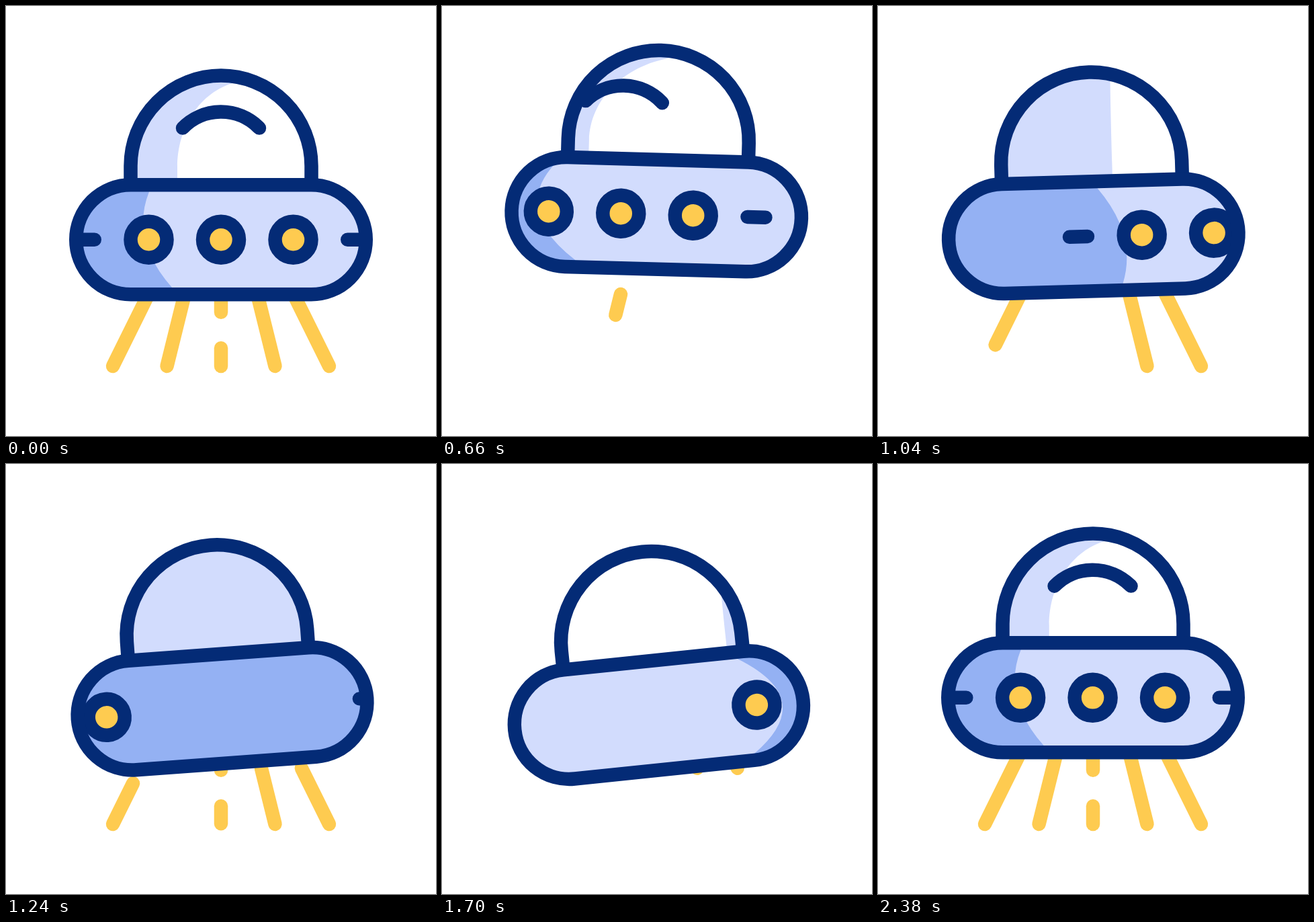
These frames come from a looping animation (640x640 px, 2400 ms). An HTML page with a canvas:

```html
<!DOCTYPE html>
<html lang="en">
<head>
<meta charset="utf-8">
<title>Flying saucer</title>
<style>
html, body { margin: 0; height: 100%; overflow: hidden; background: #fff; }
canvas { display: block; }
</style>
</head>
<body>
<canvas id="stage" width="640" height="640"></canvas>
<script>
const ctx = document.getElementById('stage').getContext('2d');
const NAVY = '#042b76', LIGHT = '#d2dcfd', SHADE = '#94b1f3', YELLOW = '#fecb50';
const LOOP = 2400, TURN = 1400, TRIM = 200;

// Keys: [time, value, slope]
const LIFT = [[0, 0], [600, -38.5], [1495, 30], [LOOP, 0]];
const TILT = [[0, 0], [640, 1.6], [1560, -6.4], [LOOP, 0]];
const SPIN = [[0, 0], [720, -54], [1040, 178.2, 1.2], [1440, 656.8, 1.18], [1980, 1218.8, 0.8], [LOOP, TURN]];

// Rays: top x, bottom x, start times of erase, draw, erase, draw
const RAYS = [
  [212, 159, [400, 913, 1150, 1875]],
  [266, 239.5, [100, 590, 800, 1640]],
  [320, 320, [420, 1050, 1282, 1980]],
  [374, 400.5, [100, 740, 1180, 1640]],
  [428, 481, [200, 760, 1180, 1640]]
];

const clamp = (v, lo, hi) => Math.min(hi, Math.max(lo, v));
const smooth = u => u * u * (3 - 2 * u);

function track(t, keys) {
  let i = 1;
  while (keys[i][0] < t) i++;
  const [t0, v0, m0 = 0] = keys[i - 1], [t1, v1, m1 = 0] = keys[i];
  const d = t1 - t0, u = (t - t0) / d, w = 1 - u;
  return v0 + (v1 - v0) * smooth(u) + d * u * w * (m0 * w - m1 * u);
}

function line(x0, y0, x1, y1) {
  ctx.beginPath();
  ctx.moveTo(x0, y0);
  ctx.lineTo(x1, y1);
  ctx.stroke();
}

function drawRay([top, bottom, times], t) {
  let from = 0, to = 1;
  times.forEach((start, i) => {
    if (t < start) return;
    const k = smooth(clamp((t - start) / TRIM, 0, 1));
    [from, to] = i % 2 ? [0, k] : [k, 1];
  });
  const parts = top === bottom ? [[0, 0.25], [0.75, 1]] : [[0, 1]];
  for (const [p, q] of parts) {
    const a = Math.max(p, from), b = Math.min(q, to);
    if (a < b) line(top + (bottom - top) * a, 429 + 107 * a, top + (bottom - top) * b, 429 + 107 * b);
  }
}

function domePath() {
  ctx.beginPath();
  ctx.moveTo(-134.5, 266);
  ctx.lineTo(-134.5, 238);
  ctx.arc(0, 238, 134.5, Math.PI, 0);
  ctx.lineTo(134.5, 266);
}

function bodyPath() {
  ctx.beginPath();
  ctx.arc(-134.25, 347.75, 81.5, Math.PI / 2, Math.PI * 1.5);
  ctx.arc(134.25, 347.75, 81.5, -Math.PI / 2, Math.PI / 2);
  ctx.closePath();
}

function inside(path, color, draw) {
  ctx.save();
  path();
  ctx.fillStyle = color;
  ctx.fill();
  ctx.clip();
  draw();
  ctx.restore();
}

// The two borders of the shaded side, bulging like meridians
function frontEdge(x) {
  const m = -90 + (x < 0 ? 0.87 : 0.64) * x;
  return { m, lean: 17, bulge: 22, base: 0.833 * m + 10, pole: 29 };
}

function backEdge(x) {
  const m = -32 + 0.64 * x;
  return { m, lean: 5.5, bulge: 10, base: 0.833 * m + 2, pole: -7 };
}

function shadeBody(left, right) {
  const ctrl = e => 1.75 * e.m + e.bulge;
  ctx.beginPath();
  ctx.moveTo(right.m - right.lean, 250);
  ctx.lineTo(right.m - right.lean, 276.5);
  ctx.quadraticCurveTo(ctrl(right), 348, right.m + right.lean, 419);
  ctx.lineTo(right.m + right.lean, 440);
  ctx.lineTo(left.m + left.lean, 440);
  ctx.lineTo(left.m + left.lean, 419);
  ctx.quadraticCurveTo(ctrl(left), 348, left.m - left.lean, 276.5);
  ctx.lineTo(left.m - left.lean, 250);
  ctx.fillStyle = SHADE;
  ctx.fill();
}

function shadeDome(left, right) {
  const topOf = e => e.pole + 0.1 * e.m + 1.5 * (e.m - clamp(e.m, -140, 60));
  const lt = topOf(left), rt = topOf(right), lb = left.base, rb = right.base;
  ctx.beginPath();
  ctx.moveTo(rb, 270);
  ctx.lineTo(rb, 240);
  ctx.bezierCurveTo(rb, 180, rb + 0.4 * (rt - rb), 128, rt, 114);
  ctx.lineTo(rt, 90);
  ctx.lineTo(lt, 90);
  ctx.lineTo(lt, 114);
  ctx.bezierCurveTo(lb + 0.4 * (lt - lb), 128, lb, 180, lb, 240);
  ctx.lineTo(lb, 270);
  ctx.fillStyle = LIGHT;
  ctx.fill();
}

function drawWindows(x) {
  for (const dx of [-107.5, 0, 107.5]) {
    ctx.beginPath();
    ctx.arc(x + dx, 347.75, 27, 0, Math.PI * 2);
    ctx.fillStyle = YELLOW;
    ctx.fill();
    ctx.stroke();
  }
}

function drawShine(x) {
  const half = Math.asin(57 / 79.7);
  ctx.beginPath();
  ctx.arc(x, 237.3, 79.7, -Math.PI / 2 - half, -Math.PI / 2 + half);
  ctx.stroke();
}

function drawSaucer(t) {
  const spin = track(t, SPIN), fronts = [spin, spin - TURN];
  ctx.save();
  ctx.translate(320, 320 + track(t, LIFT));
  ctx.rotate(track(t, TILT) * Math.PI / 180);
  ctx.translate(0, -320);
  ctx.strokeStyle = NAVY;

  inside(domePath, '#fff', () => {
    for (const x of fronts) shadeDome(backEdge(x - TURN / 2), frontEdge(x));
    fronts.forEach(drawShine);
  });
  inside(bodyPath, LIGHT, () => {
    for (const x of fronts) shadeBody(backEdge(x - TURN / 2), frontEdge(x));
    for (const x of fronts) {
      drawWindows(x);
      for (const dx of [-201.75, 201.75]) line(x + dx - 13.5, 347.75, x + dx + 13.5, 347.75);
    }
    drawWindows(spin - TURN / 2);
  });

  ctx.lineCap = 'butt';
  domePath();
  ctx.stroke();
  bodyPath();
  ctx.stroke();
  ctx.restore();
}

function frame() {
  const t = performance.now() % LOOP;
  ctx.fillStyle = '#fff';
  ctx.fillRect(0, 0, 640, 640);
  ctx.lineWidth = 20.5;
  ctx.lineCap = 'round';
  ctx.strokeStyle = YELLOW;
  for (const ray of RAYS) drawRay(ray, t);
  drawSaucer(t);
  requestAnimationFrame(frame);
}
frame();
</script>
</body>
</html>
```
